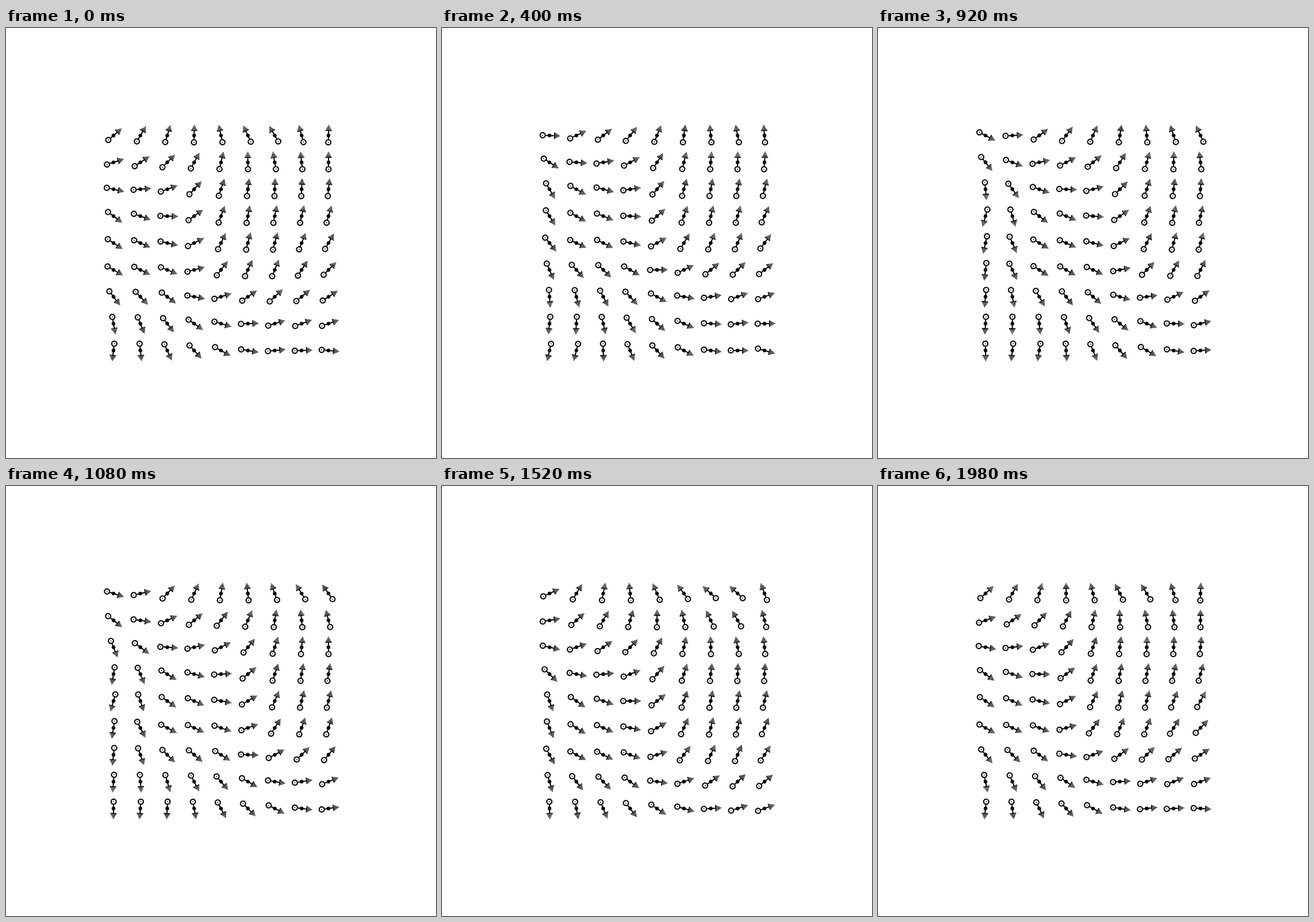
Recreate the animation shown at these times as an HTML page with a canvas. Size 748 by 748 pixels, loop 2 s.

```html
<!DOCTYPE html>
<html lang="en">
<head>
<meta charset="utf-8">
<title>Drifting pins</title>
<style>
  html, body { margin: 0; width: 100%; height: 100%; overflow: hidden; background: #fff; }
  canvas { display: block; }
</style>
</head>
<body>
<canvas id="stage" width="748" height="748"></canvas>
<script>
const ctx = document.getElementById('stage').getContext('2d');
const LOOP = 2000, STEP = 20;
const CELLS = 9, GAP = 46.75, ORIGIN = 187;
const RING = -11.9;

// Key directions in degrees, one for every second cell; the rest is interpolated.
const keys = [
  [ -8,   57,  95, 126, 138,  85],
  [-45,   18,  45,  77, 100,  90],
  [-104, -37,  -2,  70,  79,  74],
  [-98,  -30, -22,  52,  68,  45],
  [-94,  -80, -53, -17,  17,  19],
  [-86, -107, -74, -34,   0, -26]
];

// Catmull-Rom through evenly spaced values, clamped at the ends.
function spline(at, x) {
  const last = keys.length - 1, i = Math.floor(x), t = x - i;
  const [a, b, c, d] = [-1, 0, 1, 2].map(k => at(Math.max(0, Math.min(last, i + k))));
  return b + t / 2 * (c - a + t * (2 * a - 5 * b + 4 * c - d + t * (3 * (b - c) + d - a)));
}

const heading = (u, v) => spline(row => spline(col => keys[row][col], u / 2), v / 2);

function disc(x, y, r) {
  ctx.beginPath();
  ctx.arc(x, y, r, 0, 2 * Math.PI);
  ctx.fill();
}

function line(x1, y1, x2, y2, width) {
  ctx.lineWidth = width;
  ctx.beginPath();
  ctx.moveTo(x1, y1);
  ctx.lineTo(x2, y2);
  ctx.stroke();
}

function pin(x, y, degrees) {
  ctx.save();
  ctx.translate(x, y);
  ctx.rotate(-degrees * Math.PI / 180);

  line(-7.5, 0, 9, 0, 2);
  disc(0, 0, 3.2);

  // Beaded ring
  ctx.lineWidth = 1.9;
  ctx.beginPath();
  ctx.arc(RING, 0, 4.3, 0, 2 * Math.PI);
  ctx.stroke();
  for (let i = 0; i < 10; i++) {
    const a = i * Math.PI / 5;
    disc(RING + 4.8 * Math.cos(a), 4.8 * Math.sin(a), 0.9);
  }
  disc(RING, 0, 0.9);

  // Tapering bars
  for (let i = 0; i < 5; i++) {
    const bx = 8.8 + 2.2 * i, half = 5.6 - 1.2 * i;
    line(bx, -half, bx, half, i ? 1.4 : 1.8);
  }
  ctx.restore();
}

// The pins read the field from a point that travels round a circle one cell in radius.
function draw(ms) {
  const phase = Math.floor(ms % LOOP / STEP) * STEP / LOOP * 2 * Math.PI;
  const du = 1 + Math.cos(phase), dv = 1 + Math.sin(phase);
  ctx.fillStyle = '#fff';
  ctx.fillRect(0, 0, 748, 748);
  ctx.fillStyle = ctx.strokeStyle = '#000';
  for (let row = 0; row < CELLS; row++) {
    for (let col = 0; col < CELLS; col++) {
      pin(ORIGIN + col * GAP, ORIGIN + row * GAP, heading(col + du, row + dv));
    }
  }
}

const start = performance.now();
function tick() {
  draw(performance.now() - start);
  requestAnimationFrame(tick);
}
tick();
</script>
</body>
</html>
```
